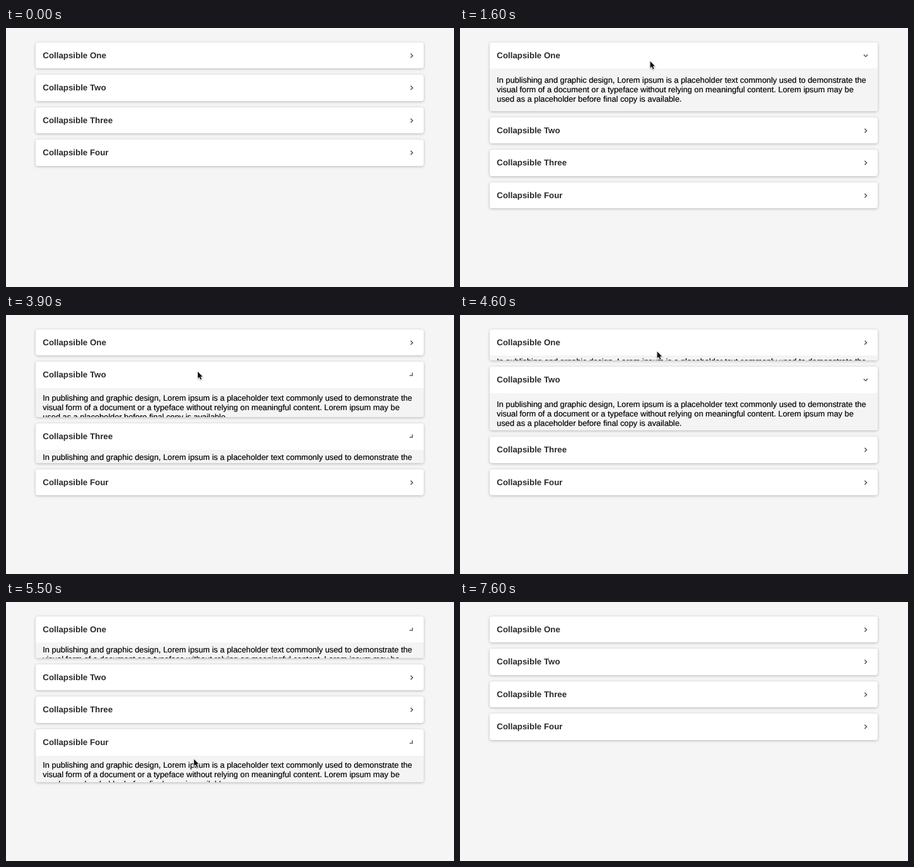
An HTML page that plays this animation: 710x411 px, repeating every 10000 ms.

```html
<!DOCTYPE html>
<html lang="en">
<head>
<meta charset="utf-8">
<title>Collapsible panels</title>
<style>
  html, body { margin: 0; width: 100%; height: 100%; overflow: hidden; background: #f5f5f5; }
  body {
    position: relative;
    font-family: "Liberation Sans", Arial, Helvetica, sans-serif;
    text-rendering: geometricPrecision;
  }
  #list { position: absolute; left: 47px; top: 22.5px; width: 615px; }
  .card {
    margin-bottom: 10px;
    border-radius: 4px;
    overflow: hidden;
    background: #fff;
    box-shadow: 0 1px 4px rgba(0, 0, 0, .26);
  }
  .head {
    position: relative;
    height: 41.6px;
    padding-left: 11.3px;
    font-weight: bold;
    font-size: 13.3px;
    line-height: 42px;
    color: #2b2b2b;
  }
  .head svg { position: absolute; left: 590.4px; top: 15px; width: 12px; height: 12px; }
  .body {
    box-sizing: border-box;
    overflow: hidden;
    padding-left: 11.3px;
    background: #f4f4f4;
    color: #000;
    font-size: 12.8px;
    line-height: 15px;
    white-space: pre;
    -webkit-text-stroke: .2px #000;
  }
  #cursor { position: absolute; left: 0; top: 0; width: 14px; height: 20px; overflow: visible; }
</style>
</head>
<body>
<div id="list"></div>
<svg id="cursor">
  <path d="M0 0V10.6L2.4 8.4L4.2 12.6L6 11.8L4.2 7.7H7.6Z" fill="#111" stroke="#fff" stroke-width="1.4"
    paint-order="stroke" style="filter: drop-shadow(0 1px 1px rgba(0,0,0,.3))"/>
</svg>
<script>
const LOOP = 10000, STEP = 100, SLIDE = 200, ENTER = 400, LEAVE = 7600;
const OPEN_HEIGHT = 67.5, PAD = 11.4;
const text = `In publishing and graphic design, Lorem ipsum is a placeholder text commonly used to demonstrate the
visual form of a document or a typeface without relying on meaningful content. Lorem ipsum may be
used as a placeholder before final copy is available.`;

// Pointer stops: it arrives, clicks to toggle a panel, and moves on once the slide is over.
const stops = [
  { arrive: 0, click: ENTER - SLIDE, x: 398, y: 335 },
  { arrive: 1200, click: 1385, x: 301.5, y: 52.5, panel: 0 },
  { arrive: 2100, click: 2290, x: 290, y: 163, panel: 1 },
  { arrive: 2900, click: 3190, x: 285.5, y: 212, panel: 2 },
  { arrive: 3700, click: 3800, x: 304, y: 90, panel: 1 },
  { arrive: 4500, click: 4585, x: 312.5, y: 58, panel: 0 },
  { arrive: 5200, click: 5411, x: 298, y: 249.5, panel: 3 },
  { arrive: 6100, click: 6433, x: 299.5, y: 144.5, panel: 2 },
  { arrive: 6650, click: 6900, x: 299.5, y: 144.5, panel: 2 },
  { arrive: 7480, click: LEAVE, x: 367, y: 396 },
];

const cards = ["One", "Two", "Three", "Four"].map(name => {
  const card = document.createElement("div");
  card.className = "card";
  card.innerHTML = `<div class="head">Collapsible ${name}<svg viewBox="-6 -6 12 12">
    <path d="M-1.7 -3.1L1.5 0L-1.7 3.1" fill="none" stroke="#5c5c5c" stroke-width="1.5"/></svg></div>
    <div class="body">${text}</div>`;
  list.append(card);
  return { body: card.querySelector(".body"), arrow: card.querySelector("path") };
});

const lerp = (a, b, k) => a + (b - a) * k;
const clamp = k => Math.max(0, Math.min(1, k));
const easeOut = k => 1 - (1 - k) ** 1.7;
const smooth = k => k * k * (3 - 2 * k);

function drawCards(t) {
  let before, now, k = 1;
  for (const { click, panel } of stops) {
    if (panel === undefined || click > t) continue;
    before = now;
    now = panel === before ? undefined : panel;
    k = clamp((t - click) / SLIDE);
  }
  cards.forEach(({ body, arrow }, i) => {
    const mix = v => lerp(+(i === before), +(i === now), v);
    const open = mix(easeOut(k));
    body.style.height = open * OPEN_HEIGHT + "px";
    body.style.paddingTop = open * PAD + "px";
    arrow.setAttribute("transform", `rotate(${90 * mix(k)})`);
  });
}

function drawCursor(t) {
  const shown = t >= ENTER && t < LEAVE;
  cursor.style.display = shown ? "" : "none";
  if (!shown) return;
  const n = stops.findLastIndex(s => s.click + SLIDE <= t);
  const a = stops[n], b = stops[n + 1], left = a.click + SLIDE;
  const k = smooth(clamp((t - left) / (b.arrive - left)));
  cursor.style.transform = `translate(${lerp(a.x, b.x, k)}px, ${lerp(a.y, b.y, k)}px)`;
}

const start = performance.now();
function frame() {
  const elapsed = (performance.now() - start) % LOOP;
  const t = Math.floor(elapsed / STEP) * STEP;
  drawCards(t);
  drawCursor(t);
  requestAnimationFrame(frame);
}
frame();
</script>
</body>
</html>
```
